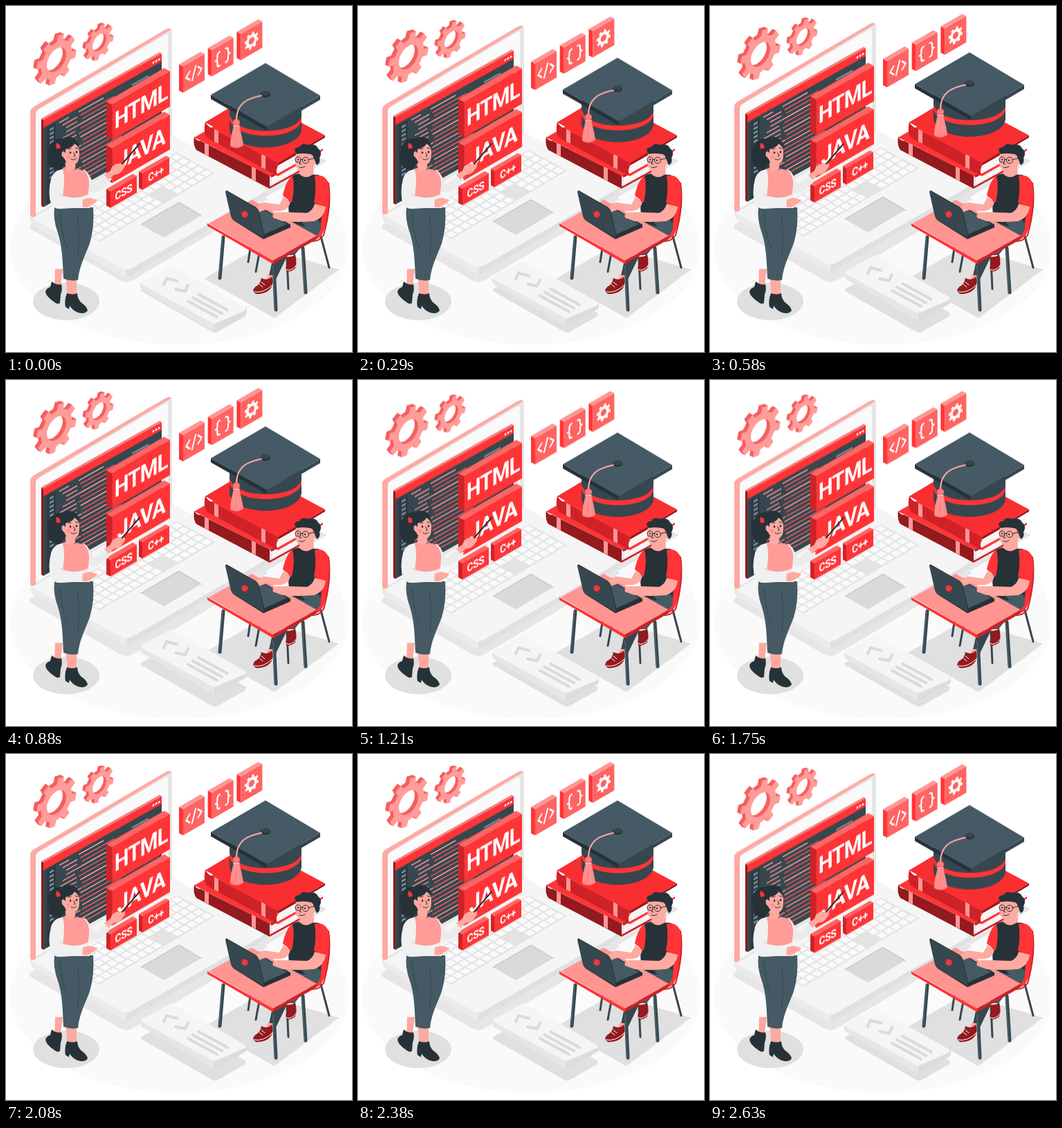
An HTML page that plays this animation: 500 by 500 pixels, repeating every 2680 ms.

```html
<!DOCTYPE html>
<html lang="en">
<head>
<meta charset="utf-8">
<title>Learning to code</title>
<style>
html, body { margin: 0; width: 100%; height: 100%; overflow: hidden; background: #fff; }
svg { display: block; width: 100vw; height: 100vh; }
text { font-family: Roboto, "Liberation Sans", sans-serif; font-weight: 700; letter-spacing: -.03em; fill: #fff; text-anchor: middle; }
.red { fill: #ff3437; } .deep { fill: #cf2227; } .wine { fill: #941a1e; }
.coral { fill: #ff6462; } .pink { fill: #ff9696; } .skin { fill: #ffa9a0; }
.ink { fill: #263238; } .slate { fill: #37474f; } .steel { fill: #455a64; }
.shade { fill: #e0e0e0; } .pale { fill: #f5f5f5; } .white { fill: #fff; }
.line { fill: none; stroke-linecap: round; stroke-linejoin: round; }
</style>
</head>
<body>
<svg viewBox="0 0 500 500" xmlns="http://www.w3.org/2000/svg">
  <ellipse cx="250" cy="349" rx="244" ry="141" fill="#fafafa"/>
  <g class="shade">
    <path d="M37 315L240 199L379 279L182 397Q174 401 166 397L37 323Q31 319 37 315Z" fill="#e6e6e6"/>
    <path d="M262 210L345 164L464 224L374 277Z" fill="#e6e6e6"/>
    <path d="M197 408L240 384L346 443Q348 446 345 449L306 471Q302 473 298 471L197 413Q192 410 197 408Z"/>
    <path d="M286 394L368 347L481 381L388 451Z"/>
    <ellipse cx="87" cy="427" rx="48" ry="27"/>
  </g>

  <g data-rise="10">
    <path d="M35 303L174 381L376 265V275L182 389Q174 394 166 389L40 318Q34 314 35 303Z" fill="#ebebeb"/>
    <path d="M174 381L376 265V275L182 389Q178 392 174 392Z" fill="#e0e0e0"/>
    <path d="M39 300L240 186L372 262Q378 266 372 270L182 379Q174 383 166 379L39 308Q33 304 39 300Z" class="pale"/>
    <g id="keys" transform="matrix(.167 -.099 .055 .03 80 311)"></g>
    <path d="M195 316L250 284L282 303L228 335Z" fill="#dadada"/>
    <path d="M195 316L250 284L282 303" class="line" stroke="#b5b5b5"/>

    <path d="M35 154Q35 149 40 146L231 34Q240 30 240 38V186Q240 190 236 192L43 304Q35 308 35 301Z" fill="#e6e6e6"/>
    <path d="M35 154Q35 149 40 146L231 34Q237 31 239 34L47 149Q43 152 43 157V304Q35 308 35 301Z" fill="#ffa9a5"/>
    <path d="M43 157Q43 152 47 150L230 42Q234 39 234 45V184Q234 188 231 190L46 299Q43 301 43 297Z" fill="#fafafa"/>
    <path d="M51 163L54 165V291L51 289Z" class="wine"/>
    <path d="M51 163L222 67L225 69L54 165Z" fill="#ff7a7a"/>
    <g id="screen" transform="matrix(1 -.56 0 1 54 165)">
      <path d="M0 0H171V126H0Z" class="slate"/>
      <path d="M0 0H171V11H0Z" class="red"/>
      <path d="M4 14H18V124H4Z" fill="#2d3b42"/>
    </g>
  </g>

  <!-- books -->
  <g>
    <path d="M272 190L338 152L452 206L381 245Z" class="red"/>
    <path d="M272 189Q275 195 281 195L381 245V264L275 208Q270 201 272 189Z" class="wine"/>
    <path d="M381 245L452 206V210L384 248Z" class="deep"/>
    <path d="M384 248L449 212V225L384 261Z" class="white"/>
    <path d="M384 253L449 217M384 257L449 221" class="line" stroke="#e0e0e0"/>
    <path d="M381 261L450 223V226L381 264Z" class="deep"/>
    <path d="M287 198L293 201V218L287 215Z" class="pink"/>
    <path d="M355 232L361 235V253L355 250Z" class="pink"/>

    <path d="M288 168L353 129L461 187L393 227Z" fill="#f82e31"/>
    <path d="M288 167Q291 174 297 176L393 227Q389 237 393 246L293 192Q284 187 288 167Z" class="deep"/>
    <path d="M393 227L461 187V190L394 230Z" class="wine"/>
    <path d="M394 230L456 195V208L392 243Q389 237 394 230Z" class="white"/>
    <path d="M392 235L456 200M392 239L456 204" class="line" stroke="#e0e0e0"/>
    <path d="M391 243L458 206V209L393 246Z" class="red"/>
    <path d="M301 178L307 181V199L301 196Z" class="pink"/>
    <path d="M369 214L375 217V236L369 233Z" class="pink"/>
  </g>

  <g data-rise="20">
    <path d="M323 145V180C326 196 350 205 375 205S424 196 427 180V145Z" class="slate"/>
    <path d="M323 158C328 174 350 181 376 181S424 173 427 160V167C422 181 400 188 376 188S327 181 323 165Z" class="red"/>
    <path d="M296 129L377 175V181L296 135Z" class="ink"/>
    <path d="M377 175L454 130V136L377 181Z" class="slate"/>
    <path d="M296 129L375 83L454 130L377 175Z" class="steel"/>
    <ellipse cx="375" cy="128" rx="7" ry="4.5" class="ink"/>
    <ellipse cx="375" cy="126.500" rx="6" ry="3.500" class="slate"/>
    <path d="M369 130C350 134 333 140 333 166" class="line" stroke="#ffaaa7" stroke-width="2"/>
    <path d="M329 173H337C339 183 342 192 343 202Q334 209 324 203C324 192 327 183 329 173Z" fill="#ff8b89"/>
    <path d="M331 178L328 202M335 178L337 203" class="line" stroke="#ff9f9f"/>
    <circle cx="333" cy="169" r="5" fill="#ff7a78"/>
    <path d="M329 174H337" class="line" stroke="#ffaaa7" stroke-width="2"/>
  </g>

  <g data-rise="10" id="air"></g>

  <g data-rise="20">
    <path d="M193 401L301 459L348 436V442Q348 445 345 447L306 469Q301 472 297 469L197 411Q193 408 193 401Z" fill="#e6e6e6"/>
    <path d="M301 459L348 436V442Q348 445 345 447L306 469Q303 471 301 471Z" fill="#dcdcdc"/>
    <path d="M198 398L235 378Q239 375 243 378L345 436Q349 439 345 441L306 458Q301 461 297 458L198 404Q193 401 198 398Z" class="pale"/>
    <g class="line" stroke="#dadada" stroke-width="4">
      <path d="M228 403L232 394L247 398M245 410L259 413L263 404"/>
      <path d="M278 417L320 440M270 422L312 445M263 427L305 450"/>
    </g>
  </g>

  <!-- teacher -->
  <g>
    <path d="M71 380H82L79 404L70 405Z" class="skin"/>
    <path d="M86 390H102L102 420H89Z" class="skin"/>
    <path d="M66 398Q73 404 80 402Q82 410 79 417L78 429Q75 432 70 428Q58 420 57 413Q58 408 64 406Z" class="ink"/>
    <path d="M88 415Q96 418 103 415Q103 422 108 428Q117 434 118 440Q114 446 104 443Q96 440 92 433L91 438L86 435Q84 425 88 415Z" class="ink"/>
    <path d="M70 291H126Q128 320 121 343C113 364 106 376 104 396Q93 398 83 394C82 360 80 342 74 325Q68 308 70 291Z" class="steel"/>
    <path d="M104 305Q106 340 104 366M78 300Q80 330 88 350" class="line" stroke="#37474f"/>
    <path d="M112 236Q119 239 127 258L148 243L153 250Q139 269 124 270Q116 266 114 254Z" fill="#ebebeb"/>
    <path d="M80 236L86 234Q94 242 102 235L113 238Q121 246 120 259Q119 268 119 273Q97 283 79 273Q83 257 80 236Z" fill="#ff9c98"/>
    <path d="M78 272Q98 282 119 272L121 292H76Z" fill="#f0f0f0"/>
    <path d="M86 226H100V235Q94 243 86 236Z" class="skin"/>
    <path d="M82 236Q69 237 65 250Q60 270 65 286Q69 294 80 293L112 291V280L82 275Q86 250 82 236Z" fill="#f0f0f0"/>
    <path d="M82 275L77 271" class="line" stroke="#d0d0d0"/>
    <path d="M111 280Q120 275 127 279L132 280Q130 285 124 287Q118 293 110 290Z" class="skin"/>
    <path d="M142 244L151 238Q153 230 160 228L171 227Q174 231 169 236Q166 243 156 244L148 251Z" class="skin"/>
    <path d="M168 228L193 199" class="line" stroke="#263238" stroke-width="2"/>
    <path d="M81 192C92 185 107 191 105 205C97 203 90 205 88 213C88 224 85 230 80 235Q75 240 70 234C64 234 60 228 62 221C59 211 61 200 70 195Q75 190 81 192Z" class="ink"/>
    <path d="M86 207Q96 205 99 199Q107 203 106 214Q106 227 99 229Q88 230 84 220Q79 216 81 211Q84 208 86 213Z" class="skin"/>
    <path d="M73 198Q78 198 79 205L74 207Q71 203 73 198Z" class="red"/>
    <g class="ink"><ellipse cx="93" cy="212" rx="1.300" ry="1.800"/><ellipse cx="102" cy="211" rx="1.300" ry="1.800"/></g>
    <path d="M90 207L94 206M100 205L104 206M98 212L100 217H98M94 221Q99 224 102 220" class="line" stroke="#263238"/>
    <circle cx="90" cy="218" r="2.500" fill="#ff7f7f" opacity=".6"/>
  </g>

  <!-- student -->
  <g>
    <g class="line" stroke="#37474f" stroke-width="3">
      <path d="M455 333L467 378M406 365L408 409M366 357L361 384M353 350L350 370"/>
    </g>
    <path d="M445 249Q463 244 467 258L468 286Q464 316 457 330Q452 338 441 338L421 325Z" class="red"/>
    <path d="M466 256Q471 288 459 331Q453 340 443 340" class="line" stroke="#cf2227" stroke-width="2"/>
    <path d="M410 306L448 309L455 322Q451 335 432 341L417 360H405L403 343Z" class="steel"/>
    <path d="M386 362H406L390 395H379Z" class="slate"/>
    <path d="M378 389H390L386 401H376Z" class="skin"/>
    <path d="M369 393Q377 398 384 391Q388 402 381 410Q373 417 361 416Q354 412 360 406Q368 402 369 393Z" class="wine"/>
    <path d="M358 413Q372 416 385 403M366 402L371 406M369 399L374 403" class="line" stroke="#fff"/>
    <path d="M404 362Q412 364 418 359Q421 372 418 379Q412 385 405 383Q403 375 407 371Z" class="wine"/>
    <path d="M405 381Q413 384 419 375" class="line" stroke="#fff"/>
    <path d="M413 246Q423 240 433 243L452 244Q462 255 458 276L455 315Q430 325 410 309Q405 280 413 246Z" class="ink"/>
    <path d="M414 245Q404 253 400 274L413 284Q418 262 414 245Z" class="red"/>
    <path d="M401 276L411 283Q409 294 398 296L374 297L361 294L364 286L374 284L395 287Z" class="skin"/>
    <path d="M446 245Q463 243 466 258Q469 272 464 289Q453 291 445 284Q449 265 446 245Z" class="red"/>
    <path d="M293 314L355 280L449 332L386 368Z" fill="#ff9490"/>
    <path d="M291 314L386 368V373L293 319Q290 318 291 314Z" class="red"/>
    <path d="M386 368L449 332V337L386 373Z" class="deep"/>
    <path d="M421 305L450 309Q460 315 451 327L440 327Z" class="steel"/>
    <path d="M329 310L371 292L411 316V320L372 337Z" class="ink"/>
    <path d="M342 308L372 294L406 315L371 331Z" class="steel"/>
    <path d="M446 286L462 290Q460 306 445 311Q421 313 400 311L386 306Q383 300 392 298L407 298L435 299Q443 296 446 286Z" class="skin"/>
    <path d="M361 292Q371 281 376 286L379 293L365 298Z" class="skin"/>
    <path d="M319 267L361 291Q364 293 365 297L374 336L328 309Q326 307 325 304L317 269Q317 266 319 267Z" class="slate"/>
    <path d="M319 267L361 291Q364 293 365 297L374 336" class="line" stroke="#263238"/>
    <circle cx="345" cy="301" r="4.500" class="red"/>
    <path d="M425 231L444 227L445 242Q434 252 424 243Z" class="skin"/>
    <path d="M419 212Q428 205 447 211L451 221Q451 228 445 229Q442 241 431 240Q419 239 418 226Z" class="skin"/>
    <path d="M420 214Q413 205 424 204Q428 197 437 201Q448 198 451 206Q458 211 453 220Q455 227 449 230L445 220Q443 213 438 214Q430 212 420 214Z" class="ink"/>
    <g class="line" stroke="#263238">
      <circle cx="422" cy="222" r="4"/><circle cx="433" cy="223" r="4.500"/>
      <path d="M426 221L429 222M437 222L446 220M424 233Q428 235 432 232M426 224L424 228H427"/>
    </g>
    <g class="ink"><circle cx="422" cy="222" r="1.200"/><circle cx="432" cy="223" r="1.200"/></g>
    <g class="line" stroke="#37474f" stroke-width="5">
      <path d="M314 334L309 393M387 375L390 439M429 350L433 414"/>
    </g>
    <path d="M313 334L308 393M386 376L389 439M428 351L432 414" class="line" stroke="#546e7a"/>
  </g>
</svg>
<script>
const $ = id => document.getElementById(id);
const rect = (x, y, w, h, fill) => `<rect x="${x}" y="${y}" width="${w}" height="${h}" fill="${fill}"/>`;
const poly = (pts, cls) => `<path class="${cls}" d="M${pts.map(p => p.join(' ')).join('L')}Z"/>`;
const iso = (x, y, body) => `<g transform="matrix(.866 -.5 0 1 ${x} ${y})">${body}</g>`;

// Keyboard: 5 rows of 16 keys on a grey bed
let keys = rect(0, 0, 1000, 1000, '#e3e3e3');
for (let r = 0; r < 5; r++) {
  for (let c = 0; c < 16; c++) {
    if (r > 2 && (c === 9 || c === 10)) continue;
    keys += rect(10 + c * 62 - (r % 2) * 6, 25 + r * 195, 50, 155, '#fafafa');
  }
}
$('keys').innerHTML = keys;

// Code window
let code = '';
for (let i = 0; i < 3; i++) code += `<circle cx="${159 + i * 4}" cy="6" r="1.500" fill="#fff"/>`;
for (let i = 0; i < 17; i++) {
  const y = 16 + i * 6.3, indent = [0, 5, 10, 10, 5][i % 5];
  if (i < 12) code += rect(9, y + 2, 6, 3, '#78909c');
  code += rect(23 + indent, y, 14 + (i * 7) % 12, 1.6, '#ff9696');
  code += rect(51 + indent / 2, y, 36 + (i * 13) % 30, 1.6, i % 3 ? '#ff5a5c' : '#ffaaa7');
}
code += rect(128, 20, 24, 2.5, '#78909c') + rect(128, 26, 34, 2.5, '#607d8b') + rect(150, 32, 14, 2.5, '#78909c');
$('screen').insertAdjacentHTML('beforeend', code);

// Slab standing on its edge: x, y is the front face's upper left corner
function slab(x, y, w, h, depth, [face, side, top] = ['red', 'deep', 'coral']) {
  const rise = w * .58, dy = depth * .52;
  return poly([[x - depth, y - dy], [x, y], [x, y + h], [x - depth, y + h - dy]], side) +
    poly([[x - depth, y - dy], [x + w - depth, y - rise - dy], [x + w, y - rise], [x, y]], top) +
    poly([[x, y], [x + w, y - rise], [x + w, y - rise + h], [x, y + h]], face);
}

function card(label, size, x, y, w, h, depth) {
  const text = `<text font-size="${size}" y="${size * .355}">${label}</text>`;
  return slab(x, y, w, h, depth) + iso(x + w / 2, y - w * .29 + h / 2, text);
}

// Cog outline with a round hole
function cog(r, teeth, hole) {
  const pts = [], step = 2 * Math.PI / teeth;
  for (let i = 0; i < teeth; i++) {
    for (const [a, k] of [[-.27, .77], [-.19, 1], [.19, 1], [.27, .77]]) {
      const t = (i + .3 + a) * step;
      pts.push([(Math.cos(t) * r * k).toFixed(2), (Math.sin(t) * r * k).toFixed(2)]);
    }
  }
  const q = r * hole;
  return `M${pts.map(p => p.join(' ')).join('L')}ZM${q} 0A${q} ${q} 0 1 0 ${-q} 0A${q} ${q} 0 1 0 ${q} 0Z`;
}

function gear(x, y, r, depth) {
  const d = cog(r, 8, .48);
  let out = '';
  for (let k = depth; k >= 0; k -= .5) {
    const fill = k ? '#f55f5f' : '#ff9c99';
    out += iso(x - k, y - k * .52, `<path d="${d}" fill="${fill}" fill-rule="evenodd"/>`);
  }
  return out;
}

const stroke = d => `<path class="line" stroke="#fff" stroke-width="2.500" d="${d}"/>`;
const icons = [
  stroke('M-7 -6L-13 0L-7 6M7 -6L13 0L7 6M3 -9L-3 9'),
  stroke('M-5 -10Q-9 -10 -9 -6V-3Q-9 0 -12 0Q-9 0 -9 3V6Q-9 10 -5 10M5 -10Q9 -10 9 -6V-3Q9 0 12 0Q9 0 9 3V6Q9 10 5 10'),
  `<path d="${cog(12, 8, .4)}" fill="#fff" fill-rule="evenodd"/>`
];

$('air').innerHTML =
  gear(73, 78, 33.5, 5) + gear(135, 53, 24, 4) +
  icons.map((icon, i) => {
    const x = 256 + i * 41.7, y = 87.5 - i * 23.5;
    return slab(x, y, 31, 38, 6, ['coral', 'red', 'pink']) + iso(x + 15.5, y + 10, icon);
  }).join('') +
  card('HTML', 34, 153.5, 143, 83.5, 51, 8.5) +
  card('JAVA', 34, 153.5, 206, 83.5, 50, 8.5) +
  card('C++', 16, 197, 242, 39, 24, 5) +
  card('CSS', 16, 151, 268, 38, 24, 6);

// Linear bobbing: [time in ms, share of the full rise]
const LOOP = 2680;
const steps = [[0, .027], [730, 1], [1480, 0], [2230, 1], [LOOP, .4]];
for (const el of document.querySelectorAll('[data-rise]')) {
  el.animate(
    steps.map(([t, k]) => ({ offset: t / LOOP, transform: `translateY(${-k * el.dataset.rise}px)` })),
    { duration: LOOP, iterations: Infinity }
  );
}
</script>
</body>
</html>
```
